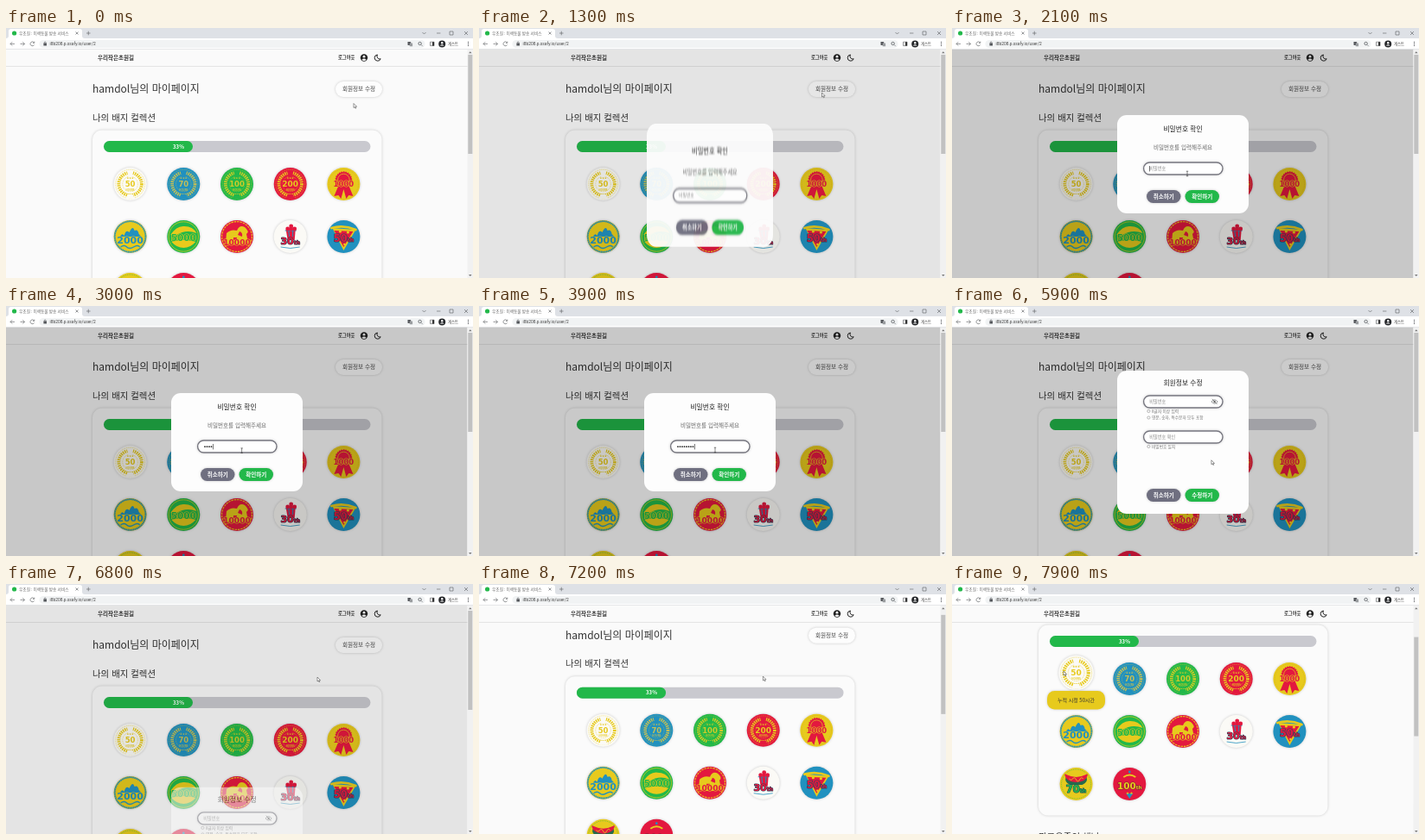
These frames come from a looping animation (540x290 px, 8 s). An HTML page:

```html
<!DOCTYPE html>
<html lang="ko">
<head>
<meta charset="utf-8">
<style>
  html, body { margin: 0; width: 100%; height: 100%; overflow: hidden; background: #fafafa; }
  svg { display: block; font-family: "Noto Sans CJK KR", "Noto Sans CJK", "Noto Sans CJK JP", sans-serif; }
  .num { font-family: "DejaVu Sans", sans-serif; font-weight: 700; paint-order: stroke; stroke-linejoin: round; }
  .ui { font-family: Roboto, "Noto Sans CJK KR", sans-serif; }
  .soft { filter: drop-shadow(0 .8px 1.5px rgba(0, 0, 0, .2)); }
  .line { fill: none; stroke: #6a6d70; stroke-width: .7; }
</style>
</head>
<body>
<svg id="stage" width="540" height="290" viewBox="0 0 540 290"></svg>
<script>
const LOOP = 8000;
const GREEN = '#22b84a', BLUE = '#2191bf', RED = '#e3183f', YELLOW = '#e7ca1d', WHITE = '#fbfaf6', NAVY = '#24485e';

// Text placed by its vertical centre.
const text = (x, y, str, size, fill = '#222', extra = '') =>
  `<text x="${x}" y="${y + size * .36}" font-size="${size}" fill="${fill}" ${extra}>${str}</text>`;
const mid = 'text-anchor="middle" ';
const bold = 'font-weight="700" ';
const box = (x, y, w, h, r, fill, extra = '') =>
  `<rect x="${x}" y="${y}" width="${w}" height="${h}" rx="${r}" fill="${fill}" ${extra}/>`;
const disc = (x, y, r, fill, extra = '') => `<circle cx="${x}" cy="${y}" r="${r}" fill="${fill}" ${extra}/>`;
const path = (d, fill, extra = '') => `<path d="${d}" fill="${fill}" ${extra}/>`;
const ring = (r, color, width, dash = '') =>
  disc(0, 0, r, 'none', `stroke="${color}" stroke-width="${width}" stroke-dasharray="${dash}"`);
const num = (y, str, size, fill, edge) =>
  text(0, y, str, size, fill, mid + `class="num" stroke="${edge}" stroke-width="1.2"`);
const nth = (y, n, size, fill, edge) => num(y, `${n}<tspan font-size="${size * .55}">th</tspan>`, size, fill, edge);

// Badge artwork, drawn around (0, 0).
const laurel = (bg, ink, n, size) => disc(0, 0, 19, bg) + ring(16.8, ink, .5, '1 .8') +
  ring(13.2, ink, 3.8, '1.5 .9') + ring(8.8, ink, .5, '1 .7') + path('M-4 -16H4L2 -8H-2ZM-3 12H3L5 17H-5Z', bg) +
  text(0, -7, '★★★', 2.8, ink, mid) + num(0, n, size, ink, bg) + text(0, 6.6, 'HOURS', 2.8, ink, mid + bold);

const rosette = () => disc(0, 0, 19, YELLOW) + ring(17, '#c99f24', .5, '1 1') +
  path('M-6 2L-11 14L-6 13L-3 17L0 6L3 17L6 13L11 14L6 2Z', RED) +
  `<g transform="translate(0 -5)">${disc(0, 0, 9, RED) + ring(9, RED, 1.5, '1.6 1') + ring(6.8, YELLOW, .7)}</g>` +
  num(0, '1000', 8.5, RED, YELLOW);

const hills = () => disc(0, 0, 19, YELLOW) + ring(17.8, BLUE, 1.8, '1.6 .5') +
  path('M-12 0Q-9 -5 -7 -1Q-5 -9 -1 -5Q3 -14 5 -7Q9 -9 10 -3L13 0Z', BLUE) +
  path('M-11 12Q-7 9 -4 12T4 12T11 12', 'none', `stroke="${BLUE}" stroke-width="1.4"`) +
  num(4.5, '2000', 11, BLUE, YELLOW);

const field5000 = () => disc(0, 0, 19, GREEN) + ring(17.2, YELLOW, .7) +
  path('M-15 -2Q-8 -13 1 -12Q11 -12 15 -4Q3 -9 -8 -2ZM-14 6Q0 2 14 6Q8 13 0 13Q-8 13 -14 6Z', YELLOW) +
  num(1, '5000', 10.5, GREEN, YELLOW);

const beast = () => disc(0, 0, 19, RED) + ring(17.4, YELLOW, 1.1, '2.4 1') +
  path('M-13 7L-12 -4Q-7 -9 0 -7Q3 -14 9 -11Q15 -6 11 -3L13 7Q0 12 -13 7Z', YELLOW) +
  path('M3 -6Q7 -5 6 0L1 -2ZM-4 1h4v3h-4Z', RED) + num(6.5, '10000', 9, RED, YELLOW);

const corn = () => disc(0, 0, 19, WHITE) + path('M-5 -8L-3 4H5L6 -8Z', RED) +
  path('M-6 -7H7M-2 -7L-1 0M3 -7V0', 'none', `stroke="${BLUE}" stroke-width="1"`) +
  [-3, 1, 5].map(x => disc(x, -9, 2.4, RED)).join('') + disc(1, -12, 2.4, RED) +
  path('M-11 12Q0 15 11 12', 'none', `stroke="${BLUE}" stroke-width=".8"`) + nth(5.5, '30', 11, RED, NAVY);

const pizza = () => disc(0, 0, 19, BLUE) + path('M-13 -10L0 16L14 -8Z', YELLOW) + path('M-11 -7L0 12L11 -6Z', RED) +
  path('M-14 -10Q0 -14 14 -8', 'none', `stroke="${YELLOW}" stroke-width="2.8" stroke-linecap="round"`) +
  disc(-4, -6, 1.6, YELLOW) + disc(5, -5, 1.6, YELLOW) + disc(1, 9, 1.3, YELLOW) + nth(2, '50', 11.5, RED, NAVY);

const hotdog = () => disc(0, 0, 19, YELLOW) + ring(17, GREEN, .6, '1 1') +
  path('M-12 -8Q0 0 12 -8Q14 -2 7 1H-7Q-14 -2 -12 -8Z', '#276b4c') +
  path('M-12 -10Q0 -4 12 -10Q11 -4 0 -3Q-11 -4 -12 -10Z', RED, `stroke="${RED}" stroke-width="2"`) +
  path('M-8 -6q2 3 4 0t4 1t4 0t4 -1', 'none', `stroke="${YELLOW}" stroke-width=".9"`) + nth(5.5, '70', 11.5, GREEN, NAVY);

const crown = () => disc(0, 0, 19, RED) + path('M-7 -8Q0 -13 7 -8', 'none', `stroke="${YELLOW}" stroke-width="2"`) +
  path('M-4 11L0 17L4 11Z', BLUE) + disc(0, -14, 1.4, BLUE) + text(0, 11, '★ ★', 3.6, YELLOW, mid) +
  nth(2.5, '100', 10.5, YELLOW, '#7c2036');

const badges = [
  laurel(WHITE, YELLOW, '50', 8.5), laurel(BLUE, '#c5bf55', '70', 8.5), laurel(GREEN, '#cfcb27', '100', 8.5),
  laurel(RED, YELLOW, '200', 9), rosette(), hills(), field5000(), beast(), corn(), pizza(), hotdog(), crown()
];
const badgeX = i => 143.6 + (i % 5) * 61.7;
const badgeY = i => 181 + Math.floor(i / 5) * 61;
const badge = (i, scale = 1, dy = 0) =>
  `<g class="soft" transform="translate(${badgeX(i)} ${badgeY(i) + dy}) scale(${scale})">${badges[i]}</g>`;

const page = box(381, 62, 54, 18, 9, '#fdfdfd', 'class="soft"') +
  text(408, 71, '회원정보 수정', 6.6, '#444', mid) +
  text(100, 71, 'hamdol님의 마이페이지', 12, '#333') +
  text(100, 104, '나의 배지 컬렉션', 10.45, '#333') +
  box(100, 118.5, 334.5, 221, 11, '#fbfbfb', 'class="soft"') +
  box(113, 131, 308.5, 13, 6.5, '#c9c9cf') + box(113, 131, 103, 13, 6.5, GREEN) +
  text(199.5, 137.5, '33%', 6, '#fff', mid + bold) +
  badges.map((_, i) => i ? badge(i) : '').join('') +
  text(100, 364, '팔로우중인 채널', 10.45, '#333');

const header = box(0, 24, 534, 20.5, 0, '#fafafa') + box(0, 44, 534, .8, 0, '#dfdfdf') +
  text(106, 34.4, '우리작은초원길', 6.5, '#333', bold) + text(384, 34.4, '로그아웃', 5.3, '#333', bold) +
  disc(414, 34.5, 4.2, '#222') + disc(414, 33.2, 1.4, '#fafafa') + path('M411.3 37Q414 34.2 416.7 37Q414 39 411.3 37Z', '#fafafa') +
  path('M429.5 31A3.6 3.6 0 1 0 433.2 35.8A3.2 3.2 0 0 1 429.5 31Z', 'none', 'stroke="#222" stroke-width="1"');

const line = d => `<path class="line" d="${d}"/>`;
const chrome = box(0, 0, 540, 12, 0, '#dee1e6') + box(0, 12, 540, 12.4, 0, '#fff') +
  path('M0 12Q3 12 3 9V3.5Q3 1 6 1H85Q88 1 88 3.5V9Q88 12 91 12Z', '#fff') +
  disc(9.6, 6, 2.6, GREEN) + text(15, 6, '우초길 : 이색동물 방송 서비스', 4.7, '#666', 'class="ui"') +
  line('M80.5 4.5l3 3m0 -3l-3 3M93 6h4.6M95.3 3.7v4.6M481.5 5l2 2l2 -2M498 6h4.4M513 4h4v4h-4zM530 4l4 4m0 -4l-4 4') +
  box(38.5, 14, 446, 9, 4.5, '#f1f3f4') +
  line('M10 18.4H5m2.2 -2.2l-2.2 2.2l2.2 2.2M16.5 18.4h5m-2.2 -2.2l2.2 2.2l-2.2 2.2M32.5 17A2.4 2.4 0 1 0 32.6 19.5M32.8 15.6v1.8h-1.8') +
  box(43.4, 17.6, 3.6, 3, .4, '#55585c') + line('M44.2 18v-1a1 1 0 0 1 2 0v1') +
  text(50.5, 18.5, 'i8b208.p.ssafy.io/user/2', 4.9, '#444', 'class="ui"') +
  box(464.5, 16, 3.6, 4, .4, '#55585c') + box(466.7, 17.5, 3.4, 3.8, .4, '#9a9da0') +
  disc(478.6, 18, 1.7, 'none', 'stroke="#55585c" stroke-width=".8"') + line('M480 19.4l1.8 1.8') +
  line('M490.5 16.2h4.6v4.4h-4.6z') + box(493, 16.2, 2, 4.4, 0, '#333') +
  disc(504.2, 18.4, 4, '#26282b') + disc(504.2, 17.2, 1.2, '#fff') + path('M501.8 20.6Q504.2 18 506.6 20.6Z', '#fff') +
  text(511, 18.4, '게스트', 4.3, '#333') +
  [-2, 0, 2].map(d => disc(534.5, 18.4 + d, .6, '#55585c')).join('') + box(0, 24, 540, .6, 0, '#d9dbde');

const pill = (x, y, label, fill) => box(x, y, 39.5, 15, 7.5, fill, 'class="soft"') +
  text(x + 19.75, y + 7.4, label, 6.55, '#fff', mid + bold);
const field = y => box(221.6, y, 91.4, 14, 7, '#fff', 'stroke="#777780" stroke-width="1.4" class="soft"');
const hint = (y, str) => disc(227.4, y, 1.6, 'none', 'stroke="#888" stroke-width=".6"') + text(231, y, str, 4.7, '#777');

const askBody = box(191, 101, 152, 114, 11, '#fdfdfd');
const askForm = n => text(267, 117.5, '비밀번호 확인', 7.8, '#222', mid) +
  text(267, 139, '비밀번호를 입력해주세요', 6.55, '#666', mid) + field(156) +
  (n ? '' : text(228.3, 163, '비밀번호', 5.2, '#888')) +
  Array.from({ length: n }, (_, i) => disc(230 + i * 2.5, 163.2, .85, '#222')).join('') +
  pill(225, 188, '취소하기', '#6f6f80') + pill(269.5, 188, '확인하기', GREEN);

const editForm = box(191, 75, 152, 166, 11, '#fdfdfd') + text(267, 89.5, '회원정보 수정', 7.8, '#222', mid) +
  field(104) + text(228.3, 111, '비밀번호', 5.2, '#888') +
  line('M300 111q3.6 -4.4 7.2 0q-3.6 4.4 -7.2 0M300.8 107.8l5.8 6.2') + disc(303.6, 111, 1.2, '#666') +
  hint(122, '8글자 이상 입력') + hint(129.5, '영문, 숫자, 특수문자 모두 포함') +
  field(145) + text(228.3, 152, '비밀번호 확인', 5.2, '#888') + hint(163, '비밀번호 일치') +
  pill(225, 212, '취소하기', '#6f6f80') + pill(269.5, 212, '수정하기', GREEN);

const tooltip = box(110, 195, 67, 21.5, 8.5, YELLOW, 'class="soft"') + text(143.5, 205.8, '누적 시청 50시간', 6, '#333', mid);

const arrow = path('M0 0V5L1.2 4L2 5.8L2.8 5.4L2 3.7H3.6Z', '#fff', 'stroke="#333" stroke-width=".5"');
const beam = path('M-1.2 -2.8H1.2M0 -2.8V2.8M-1.2 2.8H1.2', 'none', 'stroke="#333" stroke-width=".6"');

// Piecewise value from [time, value] stops.
function key(t, stops, ease = u => u) {
  const i = stops.findIndex(s => s[0] > t);
  if (i === 0) return stops[0][1];
  if (i < 0) return stops[stops.length - 1][1];
  const [a, v] = stops[i - 1], [b, w] = stops[i];
  return v + (w - v) * ease((t - a) / (b - a));
}
const smooth = u => u * u * (3 - 2 * u);

const route = [[900, 402, 87.5], [1100, 396.5, 75], [1400, 396.5, 75], [1950, 272, 169], [3700, 273, 167],
  [4650, 273, 167], [5100, 280, 182.5], [5350, 287, 194], [5700, 287, 194], [6450, 360, 108], [7050, 360, 108], [7700, 129, 101]];
const routeX = route.map(p => [p[0], p[1]]), routeY = route.map(p => [p[0], p[2]]);

function askModal(t) {
  const alpha = key(t, [[1150, 0], [1300, .94], [1500, 1], [5450, 1], [5700, 0]]);
  if (!alpha) return '';
  const e = key(t, [[1150, 3], [1300, 1], [1550, 0]]);
  const drop = key(t, [[5450, 0], [5700, 200]]);
  const n = t < 2500 ? 0 : t < 4100 ? Math.min(8, 1 + Math.floor((t - 2500) / 160)) : 9;
  const fit = (sx, sy, ty) => `transform="matrix(${sx} 0 0 ${sy} ${267 * (1 - sx)} ${ty})"`;
  const blur = e ? `style="filter:blur(${.8 * e}px)"` : '';
  const caret = t > 2000 && t < 5400 && t % 800 > 400 ? box(n ? 229.2 + n * 2.5 : 228, 160, .6, 6.4, 0, '#222') : '';
  return `<g opacity="${alpha}" transform="translate(0 ${drop})">
    <g ${fit(1 - .04 * e, 1 + .254 * e, -15.7 * e)}>${askBody}</g>
    <g ${fit(1 - .07 * e, 1 + .141 * e, 8.5 * e)} ${blur}>${askForm(n) + caret}</g></g>`;
}

function editModal(t) {
  const alpha = key(t, [[5600, 0], [5850, 1], [6600, 1], [6800, .5], [6950, 0]]);
  const drop = key(t, [[5600, 200], [5900, 0], [6600, 0], [6800, 160], [6950, 290]]);
  return alpha ? `<g opacity="${alpha}" transform="translate(0 ${drop})">${editForm}</g>` : '';
}

const stage = document.getElementById('stage');
stage.innerHTML = box(0, 0, 540, 290, 0, '#fafafa') +
  `<g id="page">${page}<g id="hover"></g></g>${header}<g id="modals"></g>` +
  box(533.5, 25, 6.5, 265, 0, '#f1f1f1') + path('M535 29.2h3.6l-1.8 -2zM535 286h3.6l-1.8 2z', '#777') +
  box(534.3, 31, 5, 115, 0, '#c1c1c1', 'id="thumb"') + chrome + '<g id="cursor"></g>';
const part = id => document.getElementById(id);

function draw(now) {
  const t = now % LOOP;
  const scroll = key(t, [[7100, 0], [7500, 71]], smooth);
  const lift = key(t, [[7680, 0], [7850, 1]], smooth);
  const dim = key(t, [[1150, 0], [1300, .09], [1500, .2], [6600, .2], [6800, .09], [6950, 0]]);
  part('page').setAttribute('transform', `translate(0 ${-scroll})`);
  part('thumb').setAttribute('y', 31 + scroll * .43);
  part('hover').innerHTML = badge(0, 1 + .07 * lift, -7 * lift) + `<g opacity="${lift}">${tooltip}</g>`;
  part('modals').innerHTML = box(0, 24.5, 533.5, 265.5, 0, '#000', `opacity="${dim}"`) + askModal(t) + editModal(t);
  part('cursor').setAttribute('transform', `translate(${key(t, routeX, smooth)} ${key(t, routeY, smooth)})`);
  part('cursor').innerHTML = t > 1850 && t < 4900 ? beam : arrow;
  requestAnimationFrame(draw);
}
requestAnimationFrame(draw);
</script>
</body>
</html>
```
